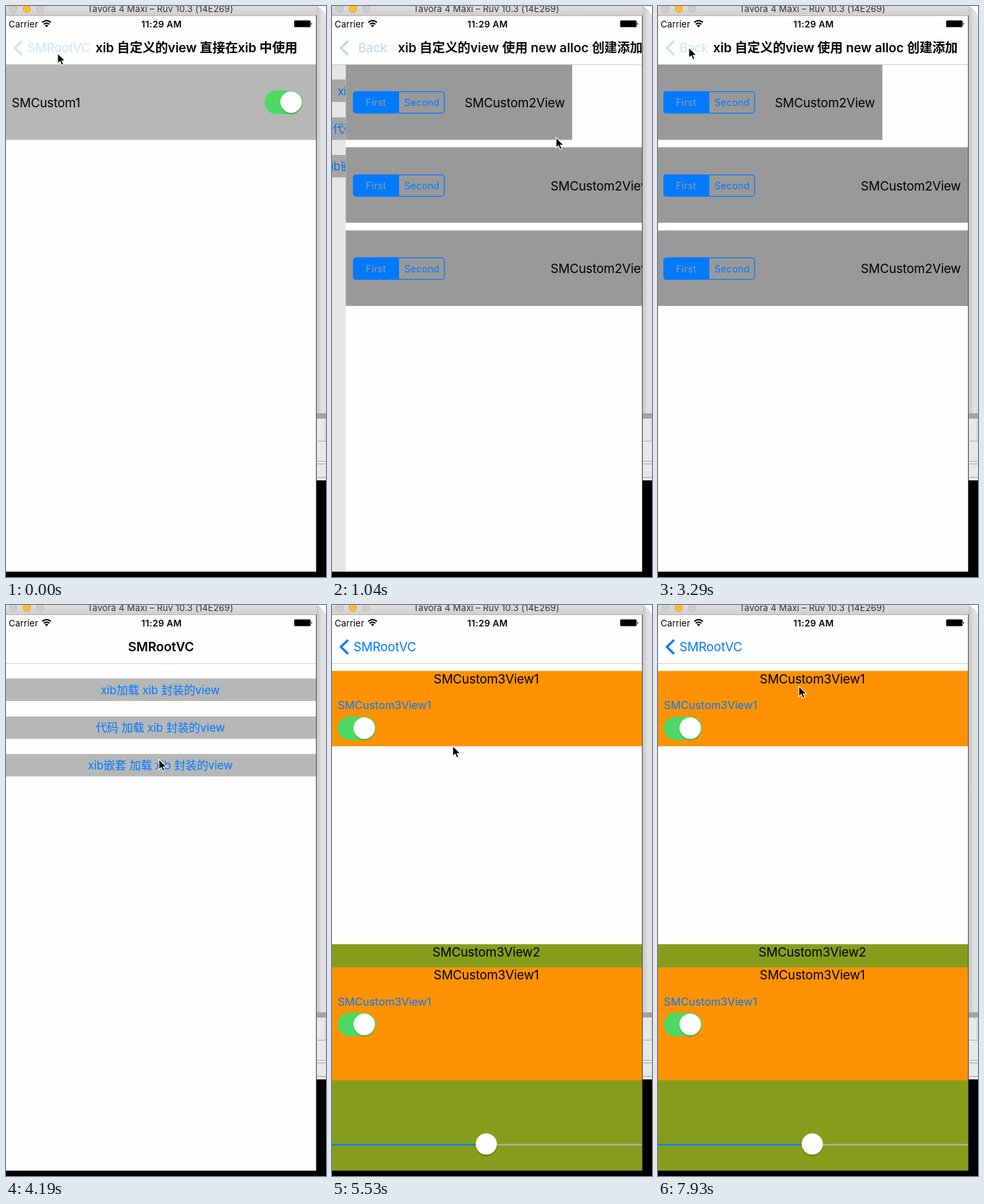
These frames come from a looping animation (477x851 px, 8 s). An HTML page:

```html
<!DOCTYPE html>
<html lang="zh">
<head>
<meta charset="utf-8">
<title>Navigation demo</title>
<style>
  html, body { margin: 0; width: 100%; height: 100%; overflow: hidden; background: #000; }
  svg { display: block; width: 477px; height: 851px; }
  text { font-family: Inter, "Noto Sans CJK SC", "Noto Sans CJK", sans-serif; font-size: 18.7px; letter-spacing: -.18px; white-space: pre; }
  .title { font-weight: 600; font-size: 19px; letter-spacing: -.07px; }
  .small { font-size: 16.5px; letter-spacing: -.1px; }
  .row { font-size: 17px; letter-spacing: -.1px; }
  .seg { font-size: 14.3px; letter-spacing: .2px; }
  .bar { font-size: 13.2px; letter-spacing: .12px; }
  .clock { font-weight: 600; letter-spacing: .4px; }
  .mid { text-anchor: middle; }
  .blue { fill: #007aff; }
  .shadow { fill: #000; opacity: .16; }
</style>
</head>
<body>
<svg viewBox="0 0 477 851">
  <defs>
    <linearGradient id="chrome" x2="0" y2="1"><stop stop-color="#dfdfdf"/><stop offset="1" stop-color="#cfcfcf"/></linearGradient>
    <linearGradient id="edge"><stop stop-color="#c4c4c4"/><stop offset=".5" stop-color="#dedede"/><stop offset="1" stop-color="#e8e8e8"/></linearGradient>
    <clipPath id="screen"><path d="M0 87H462V843H0Z"/></clipPath>
    <clipPath id="navClip"><path d="M0 36H462V87H0Z"/></clipPath>
    <g id="switch">
      <rect width="57" height="35" rx="17.5" fill="#4cd964"/>
      <circle class="shadow" cx="39.5" cy="19.5" r="16.2"/>
      <circle cx="39.5" cy="17.3" r="16" fill="#fff"/>
    </g>
    <g id="segments">
      <rect x="8.6" y="40.6" width="135.4" height="32" rx="4" fill="none" stroke="#007aff" stroke-width="1.2"/>
      <path d="M76.500 40H12.500Q8 40 8 44.500V68.500Q8 73 12.500 73H76.500Z" fill="#007aff"/>
      <text class="seg mid" x="42" y="62" fill="#999">First</text>
      <text class="seg mid blue" x="110.500" y="62">Second</text>
    </g>
  </defs>

  <!-- desktop and window frame -->
  <path d="M0 0H477V851H0Z"/>
  <path d="M463 0H477V607H463Z" fill="url(#edge)"/>
  <path d="M463 0H477V18Q474 6 463 0Z" fill="#fff"/>
  <path d="M463 0Q474 6 477 18M474.500 24V607" fill="none" stroke="#d4d4d4"/>
  <path d="M463 607H477V615H463Z" fill="#a3a3a3"/>
  <path d="M463 615H477V707H463Z" fill="#e8e8e8"/>
  <path d="M463 648.500H477M463 678.500H477M463 682.500H477M463 702.500H477" stroke="#a8a8a8"/>
  <path d="M463.500 615V707M475.500 618V648" stroke="#c8c8c8"/>
  <path d="M0 0H463V14H0Z" fill="url(#chrome)"/>
  <path d="M0 14H462V843H0Z" fill="#fefefe"/>
  <path d="M0 14.500H463" stroke="#b4b4b4"/>
  <path d="M462.500 14V843" stroke="#4c4c4c"/>
  <g stroke-width=".8">
    <circle cx="11" cy="4" r="5.700" fill="#cdcdcd" stroke="#bcbcbc"/>
    <circle cx="31" cy="4" r="5.700" fill="#fdbc2f" stroke="#e0a028"/>
    <circle cx="51" cy="4" r="5.700" fill="#cdcdcd" stroke="#bcbcbc"/>
  </g>
  <text class="bar mid" x="230" y="9" fill="#333">Tavora 4 Maxi – Ruv 10.3 (14E269)</text>

  <!-- status bar -->
  <text class="bar" x="4" y="31.500">Carrier</text>
  <text class="bar clock mid" x="232" y="31.500">11:29 AM</text>
  <path d="M54 24.500Q60.500 18.800 67 24.500M56.300 27.200Q60.500 23.600 64.700 27.200" fill="none" stroke="#000" stroke-width="1.900"/>
  <path d="M58 29Q60.500 26.800 63 29L60.500 31.700Z"/>
  <rect x="429.500" y="21.500" width="24.500" height="10" rx="1.500"/>
  <path d="M455 24.500Q457.500 26.500 455 28.500Z"/>

  <!-- pages; their left edge lies 3px off stage -->
  <g clip-path="url(#screen)">
    <g id="root">
      <path d="M-3 87H463V843H-3Z" fill="#fefefe"/>
      <path d="M-3 109.500H463V143H-3ZM-3 166H463V199.500H-3ZM-3 222H463V255.500H-3Z" fill="#b7b7b7"/>
      <g class="blue">
        <text class="row mid" x="230" y="132.500">xib加载 xib 封装的view</text>
        <text class="row mid" id="row2" x="230" y="188.700">代码 加载 xib 封装的view</text>
        <text class="row mid" id="row3" x="230" y="245">xib嵌套 加载 xib 封装的view</text>
      </g>
    </g>
    <path id="dim" d="M0 87H463V843H0Z"/>
    <g id="page1">
      <path d="M-3 87H463V843H-3Z" fill="#fefefe"/>
      <path d="M-3 87H463V199.500H-3Z" fill="#b7b7b7"/>
      <text x="8.500" y="150.500">SMCustom1</text>
      <use href="#switch" x="385.500" y="126"/>
    </g>
    <g id="page2">
      <path d="M-3 87H463V843H-3Z" fill="#fefefe"/>
      <path d="M-3 87H334.500V199.500H-3ZM-3 210.500H463V323H-3ZM-3 334.500H463V447H-3Z" fill="#999"/>
      <use href="#segments" y="87"/>
      <use href="#segments" y="211"/>
      <use href="#segments" y="334.800"/>
      <g text-anchor="end">
        <text x="323.500" y="150.500">SMCustom2View</text>
        <text x="451.500" y="274.500">SMCustom2View</text>
        <text x="451.500" y="398">SMCustom2View</text>
      </g>
    </g>
    <g id="page3">
      <path d="M-3 87H463V843H-3Z" fill="#fefefe"/>
      <path d="M-3 505.500H463V843H-3Z" fill="#869d1c"/>
      <path d="M-3 98.300H463V210.500H-3ZM-3 540H463V708.500H-3Z" fill="#ff9203"/>
      <text class="mid" x="230" y="117">SMCustom3View1</text>
      <text class="mid" x="230" y="524">SMCustom3View2</text>
      <text class="mid" x="230" y="558">SMCustom3View1</text>
      <text class="small blue" x="8.500" y="155.300">SMCustom3View1</text>
      <text class="small blue" x="8.500" y="596.800">SMCustom3View1</text>
      <use href="#switch" x="8.500" y="166.300"/>
      <use href="#switch" x="8.500" y="607.800"/>
      <path d="M-3 804.300H230" stroke="#007aff" stroke-width="2.300"/>
      <path d="M230 804.300H463" stroke="#b4b4b4" stroke-width="2.300"/>
      <circle class="shadow" cx="230" cy="805.500" r="16.200"/>
      <circle cx="230" cy="803.300" r="15.800" fill="#fff"/>
    </g>
  </g>

  <!-- navigation bar -->
  <path d="M0 87.300H462" stroke="#c6c6c6" stroke-width=".9"/>
  <g clip-path="url(#navClip)">
    <text class="title" id="rootTitle" y="69">SMRootVC</text>
    <path id="chevron" d="M24 52L13.200 62.500L24 73" fill="none" stroke="#007aff" stroke-width="3.200"/>
    <text class="blue" id="back1" x="32" y="69">SMRootVC</text>
    <text class="blue" id="back2" x="32" y="69">Back</text>
    <text class="blue" id="back3" x="32" y="69">SMRootVC</text>
    <text class="title mid" id="title1" x="284" y="69">xib 自定义的view 直接在xib 中使用</text>
    <text class="title mid" id="title2" x="264.500" y="69">xib 自定义的view 使用 new alloc 创建添加</text>
  </g>

  <path id="cursor" d="M0 0V15.500L3.600 12.200L6 17.700L8.700 16.500L6.400 11.200H11.200Z" stroke="#fff" stroke-width="1.100"/>
</svg>
<script>
const LOOP = 8000, WIDTH = 466;
const PATH = [
  [0, 77, 70.5], [150, 80, 74], [450, 230, 140], [750, 328, 190], [1040, 334, 196],
  [1340, 300, 215], [1640, 240, 170], [1940, 180, 240], [2240, 131, 276], [2540, 112, 230],
  [2840, 70, 120], [3140, 46, 62], [3440, 46, 62], [3740, 110, 130], [4190, 228, 230],
  [4940, 205, 235], [5080, 187, 234], [5530, 180, 210], [5680, 172, 183], [6130, 140, 380],
  [6580, 102, 599], [6730, -20, 640], [6880, 40, 670], [7030, 150, 694], [7180, 290, 620],
  [7330, 344, 480], [7480, 300, 340], [7630, 234, 219], [7780, 191, 165], [7930, 210, 121], [8000, 210, 121]
];
const $ = id => document.getElementById(id);
const clamp = v => Math.max(0, Math.min(1, v));
const mix = (a, b, k) => a + (b - a) * k;
const late = p => clamp((p - .93) / .07);
const shift = (id, x) => $(id).setAttribute("transform", `translate(${x} 0)`);
const fade = (id, a) => $(id).setAttribute("opacity", a);

// critically damped slide, 0 to 1
function slide(ms) {
  const x = Math.max(0, ms / 45);
  return 1 - Math.exp(-x) * (1 + x);
}

// the screen is refreshed about every 150 ms
function hold(t) {
  const base = t < 1040 ? 0 : t < 5080 ? 1040 : 5080;
  return base + Math.floor((t - base) / 150) * 150;
}

function press(t, down, up) {
  return t < down ? 1 : t < up ? .2 : clamp(.2 + (t - up) / 330);
}

function moveCursor(t) {
  const i = PATH.findIndex(p => p[0] > t);
  const [t0, x0, y0] = PATH[i - 1], [t1, x1, y1] = PATH[i];
  const k = (t - t0) / (t1 - t0);
  $("cursor").setAttribute("transform", `translate(${mix(x0, x1, k)} ${mix(y0, y1, k)})`);
}

function draw(t) {
  const shown = [1 - slide(t - 120), slide(t - 827) - slide(t - 3400), slide(t - 4983)];
  const pressed = [.2, t > 3200 ? .2 : 1, 1];
  const p = Math.max(...shown), top = shown.indexOf(p);

  shown.forEach((s, i) => {
    const n = i + 1;
    shift("page" + n, (1 - s) * WIDTH);
    shift("back" + n, (1 - s) * 140);
    fade("back" + n, late(s) * pressed[i]);
  });
  [300, 320].forEach((d, i) => {
    shift("title" + (i + 1), (1 - shown[i]) * d);
    fade("title" + (i + 1), shown[i]);
  });

  shift("root", -.3 * WIDTH * p);
  fade("dim", .1 * p);
  $("rootTitle").setAttribute("transform", `translate(${mix(182, 44, p)} 0) scale(${mix(1, .48, p)} 1)`);
  fade("rootTitle", (1 - p) ** 1.3);
  fade("chevron", late(p) * pressed[top]);
  fade("row2", press(t, 640, 790));
  fade("row3", press(t, 4780, 4950));
  moveCursor(t);
}

const start = performance.now();
function tick() {
  draw(hold((performance.now() - start + 12) % LOOP));
  requestAnimationFrame(tick);
}
tick();
</script>
</body>
</html>
```
